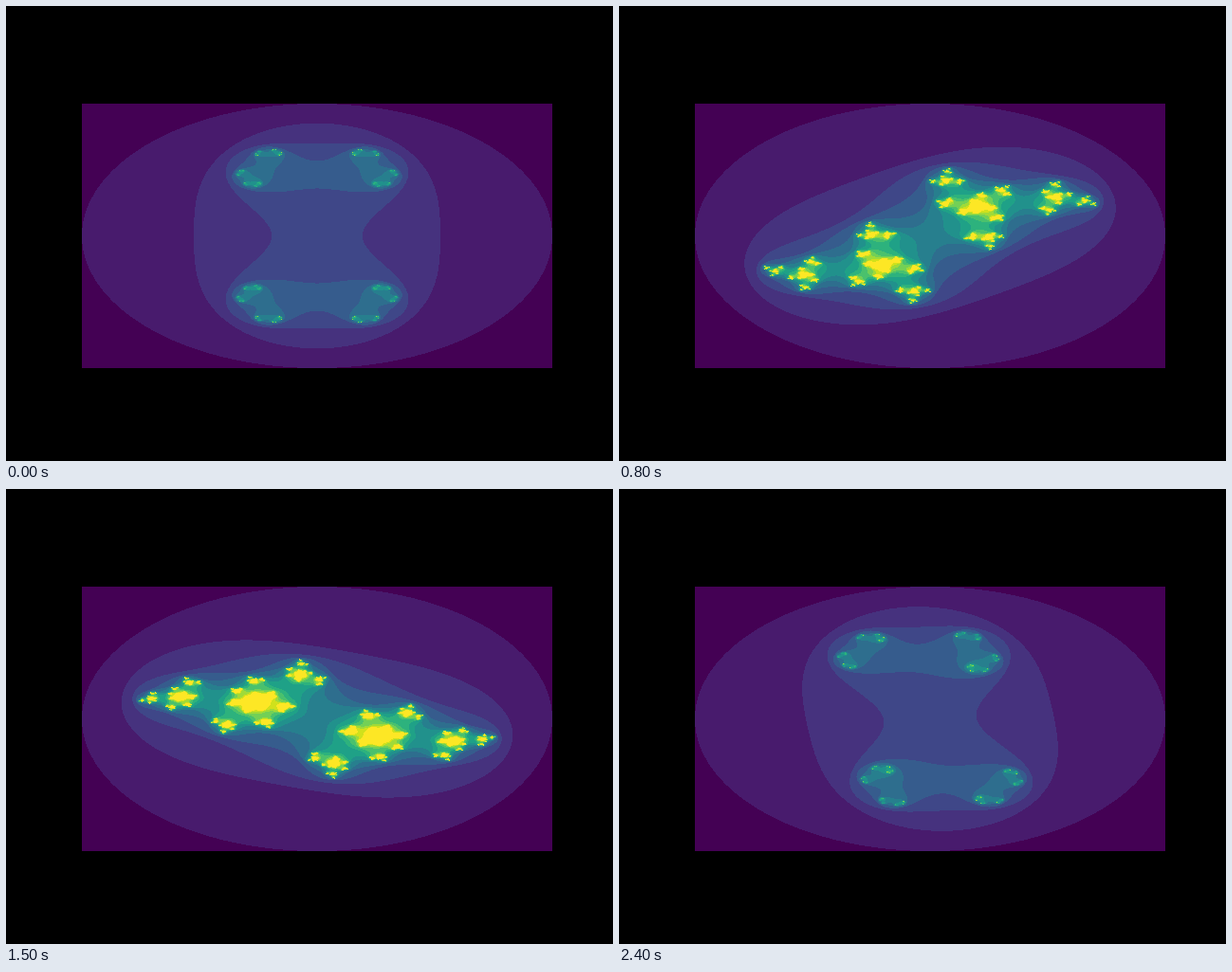
These frames come from a looping animation (640x480 px, 2.5 s). An HTML page with a canvas:

```html
<!DOCTYPE html>
<html lang="en">
<head>
<meta charset="utf-8">
<title>Julia set</title>
<style>
  html, body { margin: 0; width: 100%; height: 100%; overflow: hidden; background: #000; }
  canvas { display: block; }
</style>
</head>
<body>
<canvas id="stage" width="640" height="480"></canvas>
<script>
const STEPS = 25, STEP_MS = 100;
const LEFT = 80, TOP = 103, WIDTH = 496, HEIGHT = 279;
const RADIUS = 0.9;

// One colour per escape count; the last one is for points that stay bounded.
const PALETTE = [
  '440154', '481b6d', '46327e', '3f4788', '365c8d',
  '2e6e8e', '277f8e', '21918c', '1fa187', '2db27d',
  '4ac16d', '73d056', 'a0da39', 'd0e11c', 'fde725'
].map(hex => [0, 2, 4].map(i => parseInt(hex.slice(i, i + 2), 16)));
const LIMIT = PALETTE.length - 1;

const ctx = document.getElementById('stage').getContext('2d');
const cache = [];

function escapeCount(x, y, cx, cy) {
  let n = 0;
  while (n < LIMIT && x * x + y * y <= 4) {
    const nextX = x * x - y * y + cx;
    y = 2 * x * y + cy;
    x = nextX;
    n++;
  }
  return n;
}

function render(step) {
  const angle = 2 * Math.PI * step / STEPS;
  const cx = RADIUS * Math.cos(angle), cy = RADIUS * Math.sin(angle);
  const image = ctx.createImageData(WIDTH, HEIGHT);
  let p = 0;
  for (let row = 0; row < HEIGHT; row++) {
    const y = 4 * (row + 0.5) / HEIGHT - 2;
    for (let col = 0; col < WIDTH; col++) {
      const x = 4 * (col + 0.5) / WIDTH - 2;
      const [r, g, b] = PALETTE[escapeCount(x, y, cx, cy)];
      image.data[p++] = r;
      image.data[p++] = g;
      image.data[p++] = b;
      image.data[p++] = 255;
    }
  }
  return image;
}

ctx.fillRect(0, 0, 640, 480);

let shown = -1;
function draw() {
  const step = Math.floor(performance.now() / STEP_MS) % STEPS;
  if (step !== shown) {
    cache[step] ??= render(step);
    ctx.putImageData(cache[step], LEFT, TOP);
    shown = step;
  }
  requestAnimationFrame(draw);
}
draw();
</script>
</body>
</html>
```
